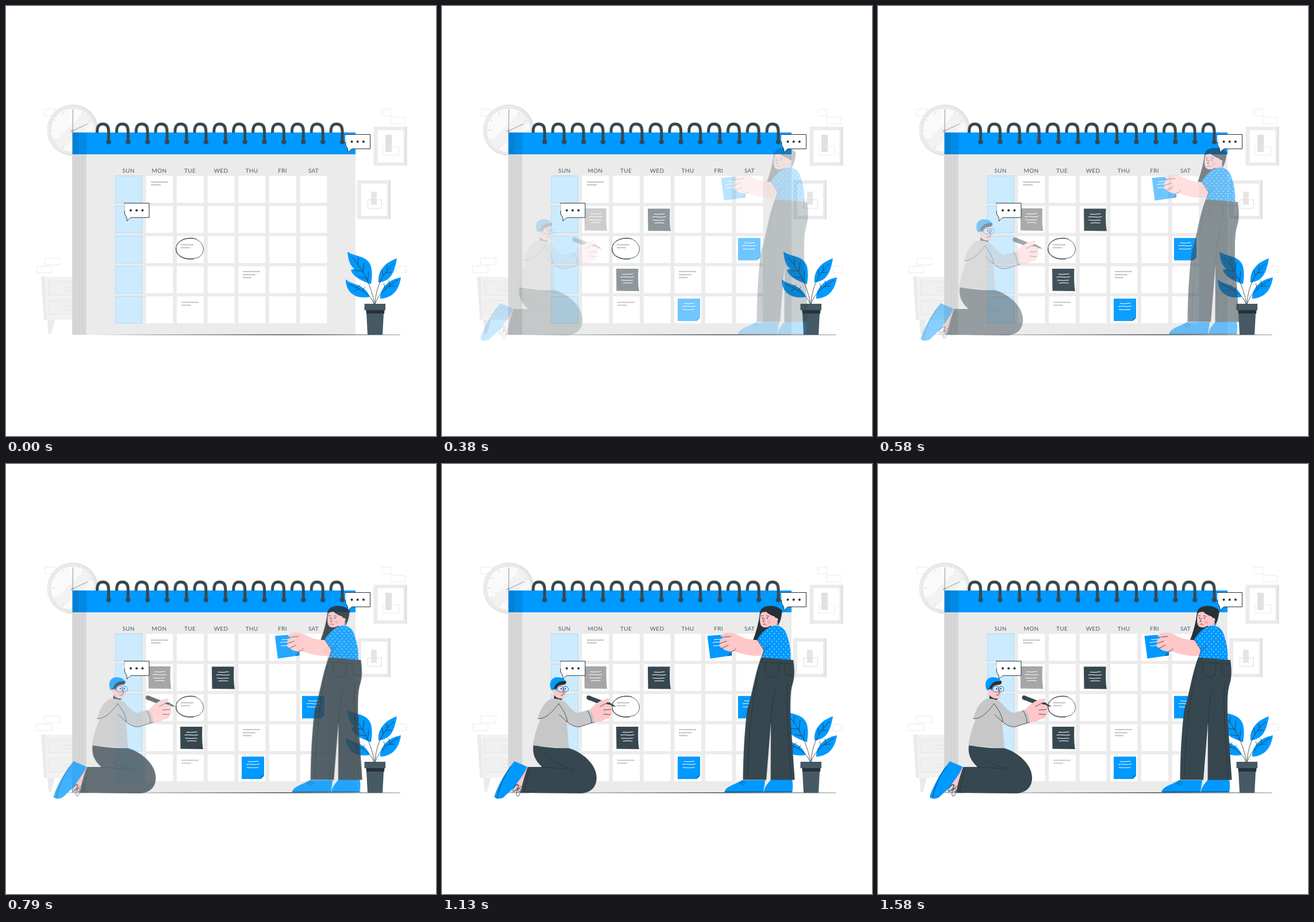
Animation, 748 px wide and 748 px high, one loop 1620 ms. Source, as an HTML page without scripts:

```html
<!DOCTYPE html>
<html lang="en">
<head>
<meta charset="utf-8">
<title>Calendar planning</title>
<style>
  html, body { margin: 0; width: 100%; height: 100%; overflow: hidden; background: #fff; }
  svg { display: block; width: 100vw; height: 100vh; }
  .blue { fill: #0099ff; }
  .dark { fill: #37474f; }
  .ink { fill: #263238; }
  .skin { fill: #ffc7c7; }
  .wool { fill: #c7c7c7; }
  .line { fill: none; stroke: #263238; stroke-width: .8; stroke-linecap: round; stroke-linejoin: round; }
  .brick { fill: none; stroke: #ebebeb; }
  .entry { fill: none; stroke: #c7c7c7; stroke-width: 2.2; }
  .scribble { fill: none; stroke: #fff; stroke-width: 1; stroke-linecap: round; }
  .days { font: 10px Lato, "Open Sans", sans-serif; letter-spacing: .3px; fill: #4f5d65; text-anchor: middle; }
  .notes, .man, .woman { animation: appear 1620ms infinite; }
  .man { animation-name: from-left; }
  .woman { animation-name: from-right; }
  @keyframes appear {
    0% { opacity: 0; animation-timing-function: cubic-bezier(.36, -.01, .5, 1.38); }
    57%, 100% { opacity: 1; }
  }
  @keyframes from-left {
    0% { opacity: 0; transform: translateX(-30px); animation-timing-function: cubic-bezier(.36, -.01, .5, 1.38); }
    97%, 100% { opacity: 1; transform: none; }
  }
  @keyframes from-right {
    0% { opacity: 0; transform: translateX(30px); animation-timing-function: cubic-bezier(.36, -.01, .5, 1.38); }
    86.5%, 100% { opacity: 1; transform: none; }
  }
</style>
</head>
<body>
<svg viewBox="0 0 748 748">
  <defs>
    <pattern id="cells" x="190" y="295.5" width="53.6" height="52.4" patternUnits="userSpaceOnUse">
      <rect width="46.8" height="46.8" fill="#fff"/>
    </pattern>
    <pattern id="sundays" x="189.5" y="295" width="53.6" height="52.4" patternUnits="userSpaceOnUse">
      <rect x=".5" y=".5" width="46.8" height="46.8" fill="#ccebff" stroke="#99d6ff" stroke-width=".8"/>
    </pattern>
    <pattern id="rings" x="153" y="200" width="33.88" height="45" patternUnits="userSpaceOnUse">
      <circle cx="25.5" cy="36.6" r="4.6" fill="#000" opacity=".2"/>
      <circle cx="25.5" cy="36.2" r="3.8" fill="#37474f"/>
      <path d="M5.600 20.500C5.200 9 9 5.300 15.500 5.300S25.500 9.500 25.500 18V36" fill="none" stroke="#37474f" stroke-width="5"/>
    </pattern>
    <pattern id="dots" x="554" y="284" width="8" height="9" patternUnits="userSpaceOnUse">
      <rect width="8" height="9" fill="#0099ff"/>
      <g fill="#fff"><circle cx="2" cy="2" r=".8"/><circle cx="6" cy="6.5" r=".8"/></g>
    </pattern>
    <path id="scribble" class="scribble" d="M11 9.500q8 1 18-.5M8 14.500q6-1 11 0t12-.5M9 20q9 1 20 0"/>
    <g id="note">
      <path d="M0 0H38.500C38 15 38 29 40 39L.5 38.500Z"/>
      <use href="#scribble"/>
      <path class="scribble" d="M12 25q8-1 16 0"/>
    </g>
    <g id="folded">
      <path d="M0 0H39V33L33 39H0Z"/>
      <path d="M39 33L33 39L34 34Z" fill="#006bb3"/>
      <use href="#scribble" y="-1"/>
    </g>
    <g id="bubble">
      <path d="M0 0H43V25H11L4.500 31L4 25L.5 19Z" fill="#fff" stroke="#263238" stroke-linejoin="round"/>
      <path d="M0 1V13" stroke="#fff" stroke-width="1.200"/>
      <g class="ink"><circle cx="11" cy="12.500" r="2"/><circle cx="21.200" cy="12.500" r="2"/><circle cx="31.400" cy="12.500" r="2"/></g>
    </g>
    <g id="picture">
      <path d="M0 0H58V68H0Z" fill="#ebebeb"/>
      <path d="M55 0H58V68H55Z" fill="#e0e0e0"/>
      <path d="M7 6H52V62H7Z" fill="#fff"/>
    </g>
    <g id="drawer" fill="#f0f0f0" stroke="#e4e4e4">
      <path d="M0 0H50V24H2Z"/>
      <path d="M30 10H44V16H30Z"/>
    </g>
  </defs>

  <!-- Room -->
  <path class="brick" d="M67 179.500h20v11.500h-20zM654 179.500h16v11.500h-16zM669 193.500h25v11.500h-25zM67 438.500h27v11.500h-27zM53 452.500h27v11.500h-27zM680 452.500h16v11.500h-16z"/>
  <g>
    <circle cx="116" cy="216" r="44.500" fill="#e0e0e0"/>
    <circle cx="114.500" cy="215.500" r="42.500" fill="#ebebeb"/>
    <circle cx="116" cy="216" r="38.500" fill="#fafafa" stroke="#e0e0e0"/>
    <path d="M84 237L137 184Q146 191 151 202L98 250Q89 245 84 237Z" fill="#f2f2f2"/>
    <circle cx="116" cy="216" r="34" fill="none" stroke="#c7c7c7" stroke-width="4" stroke-dasharray=".8 17" stroke-dashoffset=".4"/>
    <path d="M116 222L116.500 180M112 219L142 205" stroke="#a6a6a6" stroke-width="1.300"/>
    <circle cx="116" cy="217" r="2" fill="#a6a6a6"/>
  </g>
  <use href="#picture" x="639.500" y="210"/>
  <path d="M660 224h11v30h-11z" fill="#e0e0e0"/>
  <path d="M655.500 244.500h28v15h-28z" fill="none" stroke="#ebebeb"/>
  <use href="#picture" x="611" y="303"/>
  <path d="M635 323h10v23h-10z" fill="#e6e6e6"/>
  <path d="M629.500 337h24v15h-24z" fill="none" stroke="#dedede"/>
  <path d="M61 471H120V546H66Z" fill="#ebebeb"/>
  <path d="M68 471H120V546H71Z" fill="#f2f2f2"/>
  <use href="#drawer" x="73" y="479"/>
  <use href="#drawer" x="74" y="512"/>
  <path d="M72 546H85L78 571H74Z" fill="#ebebeb"/>

  <!-- Calendar -->
  <path d="M115.500 258H608V572H115.500Z" fill="#ebebeb"/>
  <path class="blue" d="M115.500 220H608V258H115.500Z"/>
  <path d="M115.500 220H140V258H115.500Z" opacity=".1"/>
  <path d="M115.500 220H126V258H115.500Z" opacity=".06"/>
  <path d="M115.500 258H140V572H115.500Z" fill="#d9d9d9"/>
  <path d="M116 259V572M120 259V572M124 259V572M128 260V572M132 260V572M136 260V572" stroke="#c7c7c7" stroke-width=".8"/>
  <path d="M153 200H592V245H153Z" fill="url(#rings)"/>
  <g class="days">
    <text x="213" y="290">SUN</text><text x="266.500" y="290">MON</text><text x="320" y="290">TUE</text>
    <text x="374" y="290">WED</text><text x="427.500" y="290">THU</text><text x="481" y="290">FRI</text><text x="535" y="290">SAT</text>
  </g>
  <path d="M243 295H559V553H243Z" fill="url(#cells)"/>
  <path d="M189.500 295H237.500V553H189.500Z" fill="url(#sundays)"/>
  <path class="entry" d="M252 306.300h30M252 311.200h17M304 415.300h22M304 420.300h16M412 462h30M412 467.300h22M412 472.300h15M305 515.500h30M305 520.500h17"/>
  <path class="line" d="M330 405C310 401 294 411 296 424C299 439 320 443 335 437C349 429 345 409 326 404C313 402 300 408 297 416M296 421C293 433 308 443 327 440"/>
  <path d="M150 572L480 571.300L686 571.800V572.200L480 572.500Z" fill="#263238"/>

  <g class="notes">
    <use href="#note" x="247.500" y="352" fill="#a6a6a6"/>
    <use href="#note" x="358" y="352.500" class="dark"/>
    <use href="#note" x="303" y="457" class="dark"/>
    <use href="#folded" x="410" y="509" class="blue"/>
    <use href="#folded" x="515" y="403.500" class="blue"/>
  </g>

  <!-- Plant -->
  <g class="blue">
    <path d="M594 427C605 437 628 432 635 453C638 467 636 476 635 484C622 479 604 473 600 459L606 457C598 452 595 440 594 427Z"/>
    <path d="M680 439C676 460 672 478 648 481C646 464 656 447 680 439Z"/>
    <path d="M687 472C684 492 674 508 651 509C650 492 664 476 687 472Z"/>
    <path d="M591 475C598 485 624 482 633 506C612 510 591 502 591 475Z"/>
  </g>
  <path class="line" d="M602 437C624 462 636 490 641 518M674 448C653 468 643 492 642 518M681 477C662 489 648 500 642 518M597 484C615 492 634 500 640 518M612 450l1-11M621 463l2-17M629 478l2-16M619 461l-12-1M626 473l-12-2M663 460l0-8M656 469l-2-10M660 464l10-1M668 485l-2-7M660 491l-3-8M664 488l12-1M610 490l6-5M620 495l4-6M614 492l-8 4"/>
  <path d="M627 535H657L655 572H629Z" fill="#455a64"/>
  <path d="M626 528H658.500L658 535H627Z" class="ink"/>
  <path d="M623.500 518H660V529H623.500Z" fill="#455a64"/>

  <g class="woman">
    <path class="blue" d="M463.500 299L500 296L506 333L468.500 338.500Z"/>
    <path d="M506 325V333L499 334Z" fill="#006bb3"/>
    <use href="#scribble" transform="translate(463.500 297) rotate(-5)"/>
    <path class="ink" d="M555 258C557 246 576 244 587 250C592 252 595 256 593 260C592 270 589 277 585 284L561 303C553 307 547 309 543 306C549 290 553 275 555 258Z"/>
    <path class="skin" d="M557 258C554 268 554 280 559 283C565 286 571 283 574 281L575 291L588 286L585 273C587 266 583 262 579 264L574 256Z"/>
    <path class="ink" d="M555 261C557 247 575 245 584 250C591 254 592 266 587 274L580 265C573 263 567 259 564 255Q560 257 555 261Z"/>
    <circle class="skin" cx="583" cy="271" r="3.300"/>
    <circle cx="586" cy="279" r="1.800" fill="none" stroke="#0099ff"/>
    <g class="ink"><circle cx="559.500" cy="268" r="1.100"/><circle cx="568" cy="268" r="1.100"/></g>
    <circle cx="571" cy="275" r="3" fill="#ff9c9c" opacity=".6"/>
    <path class="line" d="M557 264l3.500 0M566 264l5 1M563 268l-3 6h3M560 279q4-2 6 1"/>
    <path class="skin" d="M564 308C548 305 533 307 522 300C510 293 499 291 489 296C484 298 486 301 493 301C486 304 483 309 486 312C482 316 486 320 490 320C492 325 503 327 511 326C526 331 546 336 560 333L566 322Z"/>
    <path class="line" d="M493 301l11-1M486 312l11-4M490 320l10-5M506 326q5-1 7-5"/>
    <path d="M584 281C594 283 599 288 602 298C607 312 609 327 608.500 342L557 338C560 331 561 327 562 324L550 305C558 293 570 280 584 281Z" fill="url(#dots)"/>
    <path class="line" d="M550 305L562 324L571 316M562 324L558 337"/>
    <path class="blue" d="M493.500 571C494 561 511 558 524 550H564L561 571Z"/>
    <path class="blue" d="M562 571C562 561 570 555 574 549H611C613 558 612 566 611 571Z"/>
    <path class="line" d="M494 570H561M562 570H611M523 551l7 5M519 554l7 4"/>
    <path class="dark" d="M557 336.500L613 341C615 354 616 370 612 382C607 396 608 420 608 440L615.500 549.500H573.500L574 450L566 549.500H525.500C526 500 529 455 533 426C541 405 545 368 557 336.500Z"/>
    <path class="line" d="M555 344L612 348M565 346L564 364Q575 375 586 368L588 347M597 348L600 366Q608 371 612 366M574 450C576 425 577 404 584 384M554 350C548 395 537 420 533 545M603 381C599 420 606 490 609 546"/>
  </g>

  <g class="man">
    <path d="M88 572L150 571.500V572.300Z" class="ink"/>
    <path class="skin" d="M148 527L137 571L127 562L140 536Z"/>
    <path class="blue" d="M125 517L147 526.500C143 539 131 552 126 561L106 580C101 583 92 583 90 579C95 562 109 536 125 517Z"/>
    <path class="line" d="M119 526C108 540 99 560 95 581M124 563q5-9 9-4q-9 16-11 7q9-13 10-5q-7 17 0 17q7-11 2-14q-9 4-12 7M131 568q5-11 9-5q0 7-8 7"/>
    <path class="dark" d="M158 489C178 493 200 495 219 494C245 502 268 523 268 546C268 564 255 573 239 573L136 572C138 558 143 542 148 527L173 527C161 516 156 505 158 489Z"/>
    <path class="line" d="M173 527C190 530 211 527 227 534M152 529C147 544 144 558 142 571M177 503C190 520 207 527 229 530"/>
    <path class="skin" d="M194 387C200 383 207 382 214 384C217 392 216 401 212 406C207 409 204 407 205 413L194 411Z"/>
    <path class="ink" d="M194 402Q199 409 209 408Q205 411 206 414L194 409Z"/>
    <path class="ink" d="M190 391C193 379 203 375 214 377C217 380 214 384 210 384C203 385 199 385 198 394L193 396Z"/>
    <path class="blue" d="M189 393C184 379 190 371 200 371C208 371 213 374 213 378C202 377 197 382 193 391Z"/>
    <circle class="skin" cx="194.500" cy="395" r="3.300"/>
    <g fill="#fff" fill-opacity=".45" stroke="#0099ff" stroke-width="1.200"><circle cx="205" cy="391.500" r="5.200"/><circle cx="214.500" cy="391.500" r="4.300"/><path d="M195 391h5"/></g>
    <g class="ink"><circle cx="206.500" cy="391" r="1.200"/><circle cx="213.500" cy="391" r="1.200"/></g>
    <path class="line" d="M210 391l2 7h-3M206 402q4 1 5-2"/>
    <path class="wool" d="M191 408C202 408 211 411 216 417C222 424 228 431 235 433L257 427C262 433 264 441 264 449L239 457C230 458 222 453 216 448L220 494.500L157 489.500C160 471 165 456 170 444L166 443C169 428 179 410 191 408Z"/>
    <path class="line" d="M166 443C180 444 192 430 202 417M202 417C210 428 216 437 217 449C225 455 231 458 239 457L264 449M217 449L203 436M252 429Q259 438 259 450"/>
    <path d="M254 402.500L280 412.500L291 415L302 422L288 421L276 419L251 409Q249 403 254 402.500Z" class="dark"/>
    <path class="line" d="M257 404l-3 7M279 412l-3 7M291 415l-3 6"/>
    <path class="skin" d="M256 428C264 417 277 410 286 408C291 407 292 411 288 414L283 417L292 419C296 421 296 425 293 427C297 431 296 435 292 436C293 441 288 444 283 444C276 448 270 450 264 449C264 440 261 433 256 428Z"/>
    <path class="line" d="M283 417L274 422M293 427L280 428M292 436L280 435"/>
  </g>

  <use href="#bubble" x="206" y="343"/>
  <use href="#bubble" x="590.500" y="223.500"/>
</svg>
</body>
</html>
```
